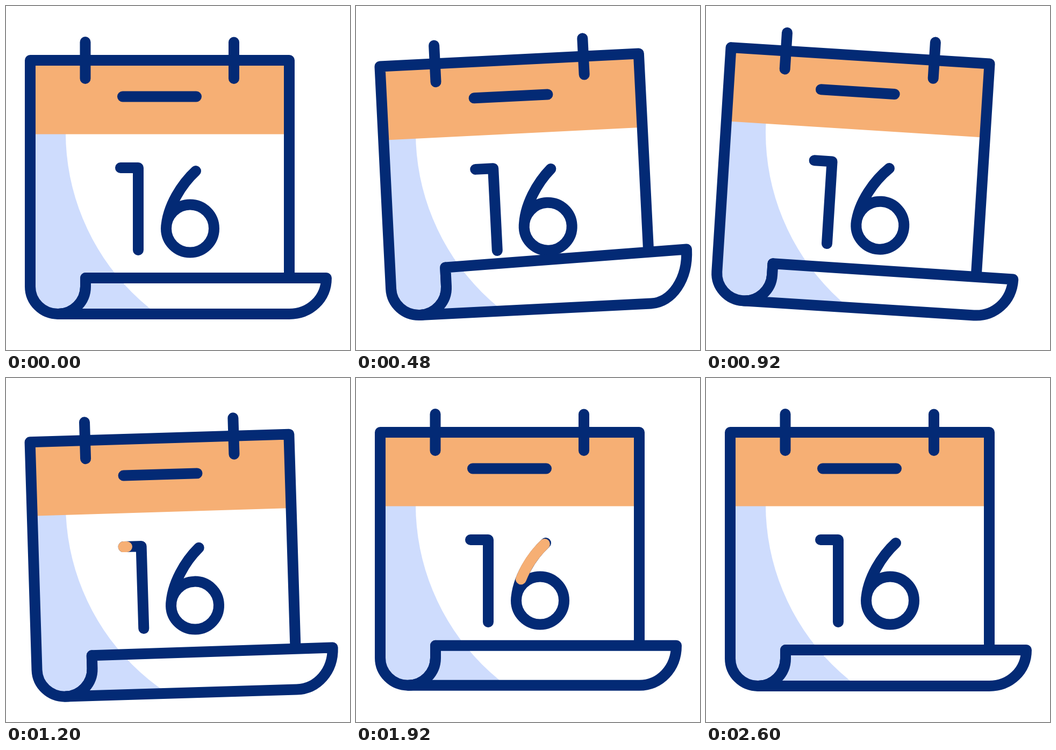
Recreate the animation shown at these times as an HTML page with a canvas. Size 640 by 640 pixels, loop 2880 ms.

```html
<!DOCTYPE html>
<html lang="en">
<head>
<meta charset="utf-8">
<title>Calendar</title>
<style>
html, body { margin: 0; width: 100%; height: 100%; overflow: hidden; background: #fff; }
canvas { display: block; width: 100vmin; height: 100vmin; }
</style>
</head>
<body>
<canvas id="stage" width="640" height="640"></canvas>
<script>
const ctx = document.getElementById('stage').getContext('2d');
const NAVY = '#032a75', ORANGE = '#f6af74', SHADE = '#cedcfd', WHITE = '#fff';
const LOOP = 2880, STEP = 40;
const PIVOT = { x: 286, y: 118 };

// A smooth swell that rises from 0 to 1 at its centre and falls back.
function swell(t, centre, reach) {
  const u = Math.min(1, Math.abs(t - centre) / reach);
  return (1 + Math.cos(Math.PI * u)) / 2;
}

function ease(t, from, duration) {
  const u = Math.min(1, Math.max(0, (t - from) / duration));
  return u * u * (3 - 2 * u);
}

function poseAt(t) {
  // Crouch, leap, land.
  const hop = 20 * swell(t, 330, 300) - 38 * swell(t, 700, 340) + 14 * swell(t, 1120, 260);
  // Lean back, swing forward, sway to rest.
  const spin = -3.16 * swell(t, 400, 400) + 3.9 * swell(t, 890, 240) - 1.9 * swell(t, 1280, 440);
  // The page rolls up in the leap, then in two smaller bounces.
  const roll = 42 * swell(t, 660, 340) + 28.5 * swell(t, 1460, 400) + 7 * swell(t, 1920, 200);
  const stretch = 24 * swell(t, 330, 330) - 13 * swell(t, 640, 300)
    + 9 * swell(t, 1180, 340) + 8 * swell(t, 1760, 320);

  const base = stretch - 0.75 * roll;
  const tilt = -0.011 * spin * roll * roll;
  return { hop, spin, base, curl: base - roll, tilt };
}

function stroke(path, color = NAVY) {
  ctx.strokeStyle = color;
  ctx.stroke(path);
}

function line(...points) {
  const path = new Path2D();
  points.forEach(([x, y]) => path.lineTo(x, y));
  return path;
}

const disc = new Path2D();
disc.arc(532, 235, 421, 0, Math.PI * 2);

const one = { path: line([213, 301], [246, 301], [246, 454]), length: 186 };
const six = { path: new Path2D('M353 307C328 330 300 372 298 414'), length: 402.6 };
six.path.arc(342.5, 414, 44.5, Math.PI, -Math.PI, true);

const fixtures = [
  line([147.5, 67], [147.5, 135]),
  line([424, 67.5], [424, 135]),
  line([217, 168.5], [354, 168.5])
];

// The white disc stays still on the stage while the paper moves over it.
function fillPaper(path) {
  ctx.save();
  ctx.fillStyle = SHADE;
  ctx.fill(path);
  ctx.clip(path);
  ctx.resetTransform();
  ctx.fillStyle = WHITE;
  ctx.fill(disc);
  ctx.restore();
}

// An orange stretch of the digit whose tail follows its head.
function sweep({ path, length }, t, begin, lag, duration) {
  const head = ease(t, begin, duration), tail = ease(t, begin + lag, duration);
  if (head === tail) return;
  ctx.save();
  ctx.setLineDash([(head - tail) * length, length * 2]);
  ctx.lineDashOffset = -tail * length;
  stroke(path, ORANGE);
  ctx.restore();
}

function draw(t) {
  const { hop, spin, base, curl, tilt } = poseAt(t);
  const bottom = 573 + base, bend = 522 + base;
  const left = 506 + curl, right = left - tilt;
  const tip = 596 + tilt / 6, side = right + (bottom - right) * 0.58;
  const scroll = `C125 ${bottom} 148 ${bend + 28} 148 ${bend}V${left}`;

  const sheet = new Path2D(
    `M527 ${right}V101H45V${bend}C45 ${bend + 28} 68 ${bottom} 97 ${bottom}${scroll}`);
  const strip = new Path2D(
    `M148 ${left}L${tip} ${right}C${tip} ${side} 565 ${bottom} 527 ${bottom}H97${scroll}Z`);

  ctx.resetTransform();
  ctx.fillStyle = WHITE;
  ctx.fillRect(0, 0, 640, 640);
  ctx.translate(PIVOT.x, PIVOT.y + hop);
  ctx.rotate(spin * Math.PI / 180);
  ctx.translate(-PIVOT.x, -PIVOT.y);
  ctx.lineWidth = 20;
  ctx.lineCap = ctx.lineJoin = 'round';

  fillPaper(sheet);
  ctx.fillStyle = ORANGE;
  ctx.fillRect(45, 101, 482, 137.5);
  stroke(sheet);
  fixtures.forEach(path => stroke(path));

  stroke(one.path);
  stroke(six.path);
  sweep(one, t, 1150, 225, 450);
  sweep(six, t, 1712, 172, 716);

  fillPaper(strip);
  stroke(strip);
}

function tick() {
  const t = performance.now() % LOOP;
  draw(Math.floor(t / STEP) * STEP);
  requestAnimationFrame(tick);
}
tick();
</script>
</body>
</html>
```
